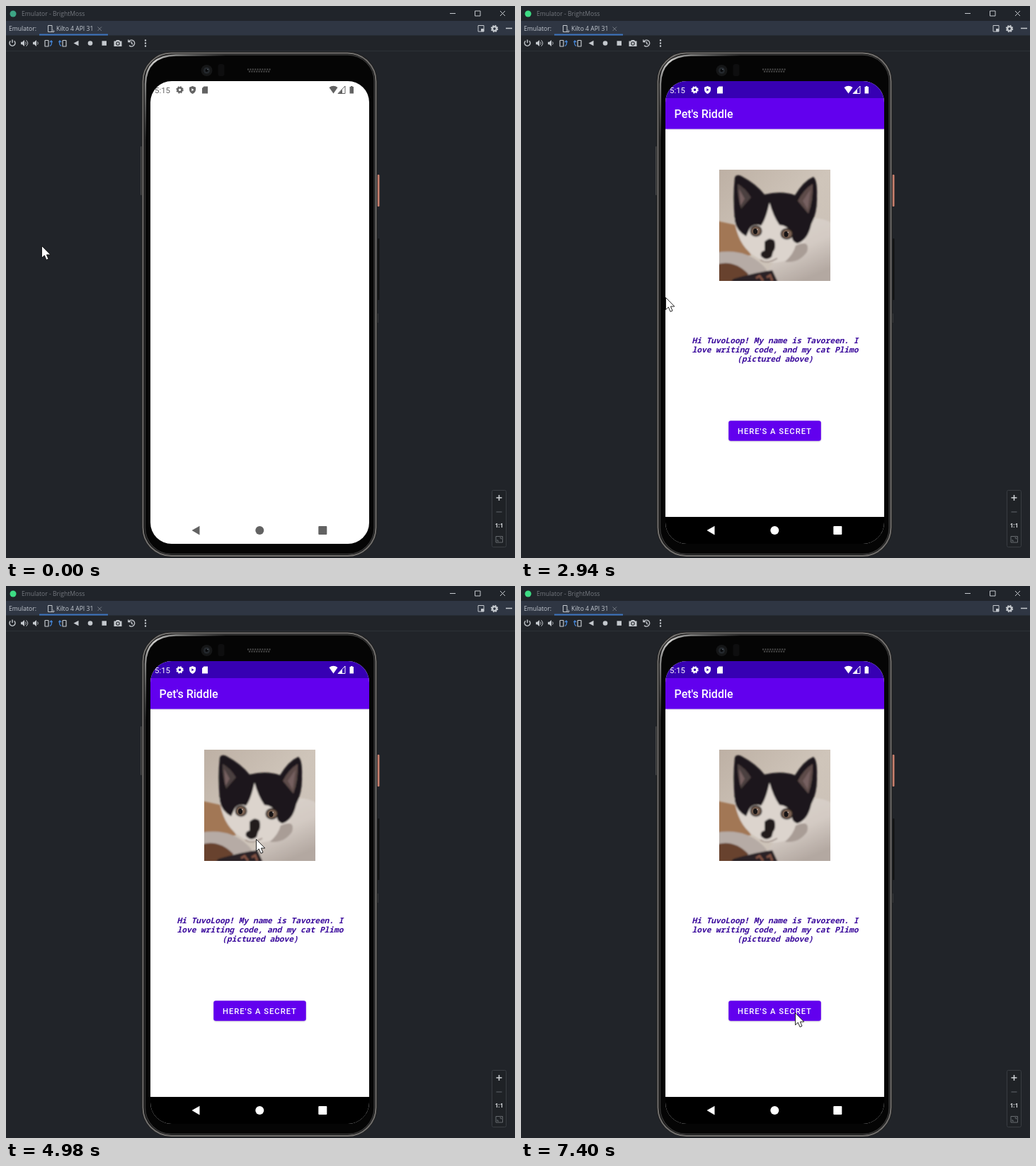
These frames come from a looping animation (719x779 px, 8 s). An HTML page:

```html
<!DOCTYPE html>
<html lang="en">
<head>
<meta charset="utf-8">
<title>Emulator</title>
<style>
  html, body { margin: 0; width: 100%; height: 100%; overflow: hidden; background: #212429; }
  svg { display: block; width: 719px; height: 779px; }
  .ui { font-family: "Open Sans", "Noto Sans", sans-serif; font-size: 8.6px; }
  .roboto { font-family: Roboto, sans-serif; }
  .line { fill: none; stroke: currentColor; }
  .note { font: italic 600 11.2px "Noto Sans Mono", monospace; fill: #3a0a9c; text-anchor: middle; }
</style>
</head>
<body>
<svg viewBox="0 0 719 779">
  <defs>
    <clipPath id="screenClip"><rect x="204" y="106" width="309" height="653" rx="30"/></clipPath>
    <clipPath id="photoClip"><rect x="280" y="231" width="157" height="157"/></clipPath>
    <filter id="soft" x="-10%" y="-10%" width="120%" height="120%"><feGaussianBlur stdDeviation="1"/></filter>
    <linearGradient id="wall" x2="1" y2="1">
      <stop stop-color="#bdb0a4"/><stop offset=".5" stop-color="#cfc5ba"/><stop offset="1" stop-color="#c9bfb6"/>
    </linearGradient>
    <linearGradient id="fur" x2=".5" y2="1">
      <stop stop-color="#ddd6cf"/><stop offset=".6" stop-color="#d3cac3"/><stop offset="1" stop-color="#b3a8a1"/>
    </linearGradient>
    <linearGradient id="gloss" gradientUnits="userSpaceOnUse" x1="197" y1="190" x2="310" y2="69">
      <stop stop-color="#999" stop-opacity="0"/><stop offset=".55" stop-color="#cfcfcd"/><stop offset="1" stop-color="#999" stop-opacity="0"/>
    </linearGradient>
    <g id="gear" class="line">
      <circle r="2.9" stroke-width="2.4"/>
      <circle r="4.4" stroke-width="1.6" stroke-dasharray="2 1.456"/>
    </g>
    <g id="speaker">
      <path d="M-5-1.7H-3L0-4.5V4.5L-3 1.7H-5Z" fill="currentColor"/>
      <path class="line" d="M1.5-2Q3 0 1.5 2"/>
    </g>
    <g id="turn">
      <rect class="line" x="-5" y="-4" width="5" height="8.5" rx=".6" stroke-width="1.2"/>
      <path class="line" d="M2 4Q5.5 2 4-2.5M2-1.5L4-3.5L5.6-1.3" style="color:#4585d6" stroke-width="1.3"/>
    </g>
  </defs>

  <!-- Window chrome -->
  <rect width="719" height="779" fill="#212429"/>
  <rect width="719" height="21" fill="#20242a"/>
  <rect y="21" width="719" height="20.5" fill="#2f3643"/>
  <rect y="63" width="719" height="1" fill="#2d3136"/>
  <circle id="logo" cx="10" cy="11" r="4.5" fill="#3ddc84"/>
  <g class="ui">
    <text x="22" y="14" fill="#74787f">Emulator - BrightMoss</text>
    <text x="4" y="35" fill="#c3c8d0">Emulator:</text>
    <text x="71" y="35" fill="#c3c8d0">Kilto 4 API 31</text>
  </g>
  <rect x="47" y="39.5" width="97" height="2" fill="#3f76c0"/>
  <g color="#c4c8cd" stroke-width="1">
    <path class="line" d="M627 10.5H635M662.5 7H670V14H662.5ZM698 7L705 14M705 7L698 14" stroke="#b6b8ba"/>
    <path class="line" d="M59.5 27.5H65V36.5H59.5ZM63.5 36.5H68M66 33.5L68.5 36"/>
    <path class="line" d="M129.5 29.5L135 35M135 29.5L129.5 35" style="color:#757b85"/>
    <path class="line" d="M667 27.5H675V36H667Z"/>
    <rect x="671" y="32" width="4" height="4" fill="currentColor"/>
    <use href="#gear" x="690" y="32"/>
    <path class="line" d="M706 31.5H715" stroke-width="1.5"/>

    <path class="line" d="M6.4 49.3A4 4 0 1 0 11.6 49.3M9 47.5V52" stroke-width="1.4"/>
    <use href="#speaker" x="26" y="52.5"/>
    <path class="line" d="M28.5 48.3Q33 52.5 28.5 56.7"/>
    <use href="#speaker" x="43" y="52.5"/>
    <use href="#turn" x="60" y="52.5"/>
    <use href="#turn" transform="translate(80 52.5) scale(-1 1)"/>
    <path d="M95.5 52.5L102.5 48.7V56.3Z" fill="currentColor"/>
    <circle cx="119" cy="52.5" r="3.3" fill="currentColor"/>
    <rect x="135.5" y="49.3" width="6.5" height="6.5" fill="currentColor"/>
    <path d="M152.5 49.5H155L156 48H160L161 49.5H163.5V57H152.5Z" fill="currentColor"/>
    <circle cx="158" cy="53" r="2.2" fill="none" stroke="#212429" stroke-width="1.1"/>
    <path class="line" d="M173.5 50A4.5 4.5 0 1 1 174 55.7M172.8 47.5V50.5H176M177.5 50V53L179.5 54" stroke-width="1.3"/>
    <path class="line" d="M197 48.5V57.5" stroke-width="2.4" stroke-linecap="round" stroke-dasharray="0 4"/>
  </g>

  <!-- Zoom controls -->
  <rect x="686.5" y="683.5" width="20" height="80" rx="2" fill="#1f2226" stroke="#393d42"/>
  <path d="M692.5 694H700.5M696.5 690V698" stroke="#d0d3d6" stroke-width="1.5"/>
  <path d="M692.5 714H700.5" stroke="#63676c"/>
  <text class="ui" x="696.5" y="736" text-anchor="middle" fill="#d0d3d6" font-weight="bold" style="font-size:8px">1:1</text>
  <path d="M692 748.5H701.5V757H692ZM694 753V755H696M699.5 752.5V750.5H697.5" fill="none" stroke="#686c70"/>

  <!-- Phone body -->
  <rect x="190" y="198" width="2.5" height="69" rx="1" fill="#4a4b4c"/>
  <rect x="524.5" y="238" width="3" height="45" rx="1" fill="#c77f6d"/>
  <rect x="525" y="328" width="2.5" height="87" rx="1" fill="#121314"/>
  <rect x="524.5" y="434" width="1.5" height="13" fill="#36383a"/>
  <rect x="191.5" y="64.5" width="333" height="713" rx="42" fill="#1c1c1c"/>
  <rect x="193.5" y="66.5" width="329" height="709.5" rx="40" fill="#0b0b0b" stroke="#72706e" stroke-width="2"/>
  <rect x="196.5" y="69" width="323.5" height="704.5" rx="37" fill="#050505" stroke="#353535" stroke-width="1.4"/>
  <path d="M197 190V110Q197.5 70.5 240 69.5H310" fill="none" stroke="url(#gloss)" stroke-width="2.4"/>
  <circle cx="283.5" cy="91" r="8" fill="#151617"/>
  <circle cx="283.5" cy="91" r="4.5" fill="#24282d"/>
  <circle cx="283.5" cy="91" r="2" fill="#090a0c"/>
  <circle cx="285" cy="89.5" r=".8" fill="#687079"/>
  <rect x="299.5" y="82" width="9" height="17" rx="3" fill="#0e0e0f"/>
  <path d="M342 89.5H376M344 92.5H374" stroke="#434343" stroke-width="2.4" stroke-linecap="round" stroke-dasharray="0 3.4"/>

  <!-- Phone screen -->
  <g clip-path="url(#screenClip)">
    <rect x="204" y="106" width="309" height="653" fill="#fff"/>
    <g id="app" opacity="0">
      <rect x="204" y="106" width="309" height="25" fill="#3700b3"/>
      <rect x="204" y="130" width="309" height="45" fill="#000" opacity=".08"/>
      <rect x="204" y="130" width="309" height="43.6" fill="#6200ee"/>
      <text class="roboto" x="216.5" y="158" font-size="16" font-weight="500" fill="#fff">Pet's Riddle</text>
      <rect x="204" y="721" width="309" height="38" fill="#000"/>

      <g clip-path="url(#photoClip)">
        <rect x="280" y="231" width="157" height="157" fill="url(#wall)"/>
        <g filter="url(#soft)">
          <path d="M276 303L303 309L325 352L276 352Z" fill="#a27755"/>
          <path d="M395 302Q424 295 441 308V392H335L365 350Z" fill="url(#fur)"/>
          <path d="M301 300Q320 280 350 275L400 300Q410 338 382 356Q352 370 327 351Q306 336 301 300Z" fill="#dcd4cd"/>
          <!-- Dark mask with the white blaze cut between the eyes -->
          <path d="M302 303Q299 268 302 242Q305 236 313 241Q332 251 344 266Q368 260 387 267Q399 247 413 241Q419 246 418 268Q419 291 410 308Q405 331 390 335Q381 332 383 321Q376 309 365 309Q356 296 351 277Q346 301 339 310Q327 306 322 316L318 325Q304 317 302 303Z" fill="#1d191a"/>
          <path d="M306 251Q317 257 325 270L311 286Q305 268 306 251Z" fill="#4c3f3f"/>
          <path d="M412 251Q399 259 391 275L406 293Q413 274 412 251Z" fill="#5d4b4a"/>
          <path d="M308 258L316 272L310 282ZM409 259L398 275L405 287Z" fill="#766060"/>
          <path d="M388 338Q409 329 404 347Q393 363 373 361Q385 350 388 338Z" fill="#a99d96"/>
          <path d="M276 348Q320 340 347 372L340 392H276Z" fill="#b6aba5"/>
          <path d="M276 365Q300 357 321 378L312 392H276Z" fill="#68432f"/>
          <path d="M300 385Q335 375 355 373L363 390H296Z" fill="#2a2425"/>
          <path d="M332 384L337 381L342 388M347 383L352 380L355 388" fill="none" stroke="#855445" stroke-width="3"/>
          <path d="M344 333Q351 325 358 331Q361 341 356 347L354 354Q347 361 339 353Q337 347 344 345Z" fill="#211b1c"/>
          <path d="M338 358Q347 365 362 356" fill="none" stroke="#9a8b84" stroke-width="1.5"/>
          <g stroke="#2a2322" stroke-width="2" fill="#7d6452">
            <ellipse cx="332" cy="317.5" rx="7.5" ry="7"/>
            <ellipse cx="375.5" cy="321.5" rx="8" ry="7"/>
          </g>
        </g>
        <g fill="#171415">
          <ellipse cx="331" cy="318" rx="3" ry="4"/>
          <ellipse cx="374.5" cy="322" rx="3" ry="4"/>
        </g>
        <path d="M333 315.5H334.5M376.5 319.5H378" stroke="#bdb4ae" stroke-width="1.3"/>
      </g>

      <g class="note">
        <text x="359" y="475.5">Hi TuvoLoop! My name is Tavoreen. I</text>
        <text x="359" y="488.8">love writing code, and my cat Plimo</text>
        <text x="359" y="502.2">(pictured above)</text>
      </g>
      <rect x="293.5" y="586" width="130" height="28.5" rx="3" fill="#000" opacity=".22" filter="url(#soft)"/>
      <rect x="293.2" y="585.2" width="130.6" height="28.6" rx="3.2" fill="#6200ee"/>
      <text class="roboto" x="306" y="604" font-size="11.2" font-weight="500" letter-spacing="1" fill="#fff">HERE'S A SECRET</text>
    </g>

    <g id="bars" color="#626262" fill="currentColor">
      <text class="roboto" x="210" y="122.5" font-size="11.4">5:15</text>
      <use href="#gear" x="245.5" y="118.3"/>
      <path fill-rule="evenodd" d="M263.5 113L268 114.8V118.5Q267.5 122 263.5 124Q259.5 122 259 118.5V114.8ZM262.3 116.3V120.3L265.5 118.3Z"/>
      <path d="M279.5 113.5H285V123.5H277V116Z"/>
      <path d="M456.5 115Q462.5 110.5 468.5 115L462.5 123.5Z"/>
      <path d="M479 113V123.5H469Z" fill="none" stroke="currentColor"/>
      <path d="M475 117.5V123.5H469.5Z"/>
      <path d="M485.5 114H487V113H489.5V114H491V123.5H485.5Z"/>
      <path d="M262.5 740L273.5 733.8V746.5Z"/>
      <circle cx="358.3" cy="740" r="6"/>
      <rect x="441.3" y="734" width="12" height="12" rx="1"/>
    </g>
  </g>

  <path id="cursor" d="M.5.5V17.5L4.3 14L7 20.3L10 19L7.4 13H12.8Z" fill="#fff" stroke="#111" stroke-width=".9"/>
</svg>
<script>
const LOOP = 8000;

// Holds each value until the next; rows are [ms, value].
function play(id, prop, rows) {
  const frames = rows.map(([ms, value]) => (
    { offset: Math.max(0, ms - 1) / LOOP, [prop]: value, easing: 'step-end' }));
  frames.push({ offset: 1, [prop]: rows.at(-1)[1] });
  document.getElementById(id).animate(frames, { duration: LOOP, iterations: Infinity });
}

// Each move: start ms, end ms, number of jumps, evenly timed waypoints.
const moves = [
  [2580, 2940, 6, [[50, 338], [96, 357], [166, 394], [204, 411]]],
  [3470, 4220, 12, [[204, 411], [295, 349], [400, 358], [456, 430], [441, 512]]],
  [4290, 5050, 12, [[441, 512], [378, 391], [359, 364], [351, 355]]],
  [5120, 5470, 6, [[351, 355], [316, 342], [355, 318], [393, 307]]],
  [5800, 6510, 11, [[393, 307], [422, 350], [446, 425], [447, 465]]],
  [6770, 7400, 10, [[447, 466], [409, 486], [394, 525], [388, 565], [387, 592], [387, 602]]]
];

function along(points, u) {
  const place = u * (points.length - 1);
  const i = Math.min(Math.floor(place), points.length - 2);
  return points[i].map((a, axis) => a + (points[i + 1][axis] - a) * (place - i));
}

const at = ([x, y]) => `translate(${Math.round(x)}px, ${Math.round(y)}px)`;
const track = [[0, at([50, 338])]];
for (const [start, end, jumps, points] of moves) {
  for (let k = 0; k < jumps; k++) {
    const ms = Math.round((start + (end - start) * k / (jumps - 1)) / 10) * 10;
    track.push([ms, at(along(points, (k + 1) / jumps))]);
  }
}

play('cursor', 'transform', track);
play('logo', 'fill', [[0, '#3da585'], [200, '#3ddc84']]);
play('app', 'opacity', [[0, 0], [1670, 1]]);
play('bars', 'color', [[0, '#626262'], [1670, '#ffffff']]);
</script>
</body>
</html>
```
